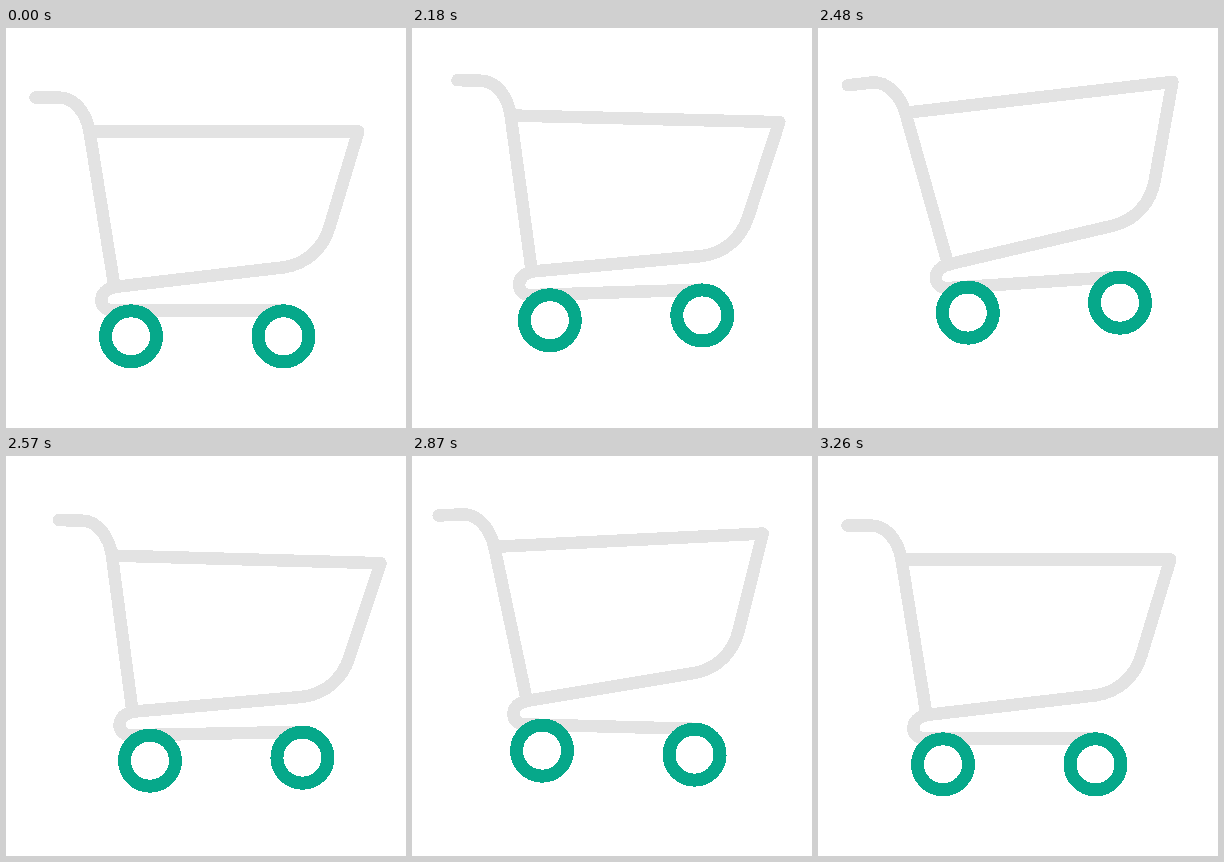
Animation of 400x400 px, one loop 3290 ms. Source, as an HTML page:

```html
<!DOCTYPE html>
<html lang="en">
<head>
<meta charset="utf-8">
<title>Hopping cart</title>
<style>
  html, body { margin: 0; width: 100%; height: 100%; overflow: hidden; background: #fff; }
  svg { display: block; width: 100vw; height: 100vh; shape-rendering: crispEdges; }
  path, circle { fill: none; stroke-width: 12.5; stroke-linecap: round; stroke-linejoin: round; }
  path { stroke: #e3e3e3; }
  circle { stroke: #06a88a; stroke-width: 13; }
</style>
</head>
<body>
<svg viewBox="0 0 400 400">
  <g id="cart">
    <path d="M110 259C91 261 91 282.5 107 282.5H277"/>
    <g id="basket">
      <path d="M29.5 69.5H53C68 69.5 80 84 83.5 103.5L108.5 259L278 239.3C300 236 317 221 323.5 199L352.3 103.5H84"/>
    </g>
    <circle cx="125" cy="308.3" r="25.5"/>
    <circle cx="277.5" cy="308.3" r="25.5"/>
  </g>
</svg>
<script>
const LOOP = 3290, REST = 2000, STEP = 30;

// Eased 0 to 1 between times a and b
function ease(t, a, b) {
  const u = Math.min(1, Math.max(0, (t - a) / (b - a)));
  return u * u * (3 - 2 * u);
}

// Rises from a to a peak at b, falls back by c
const swing = (t, a, b, c) => ease(t, a, b) * (1 - ease(t, b, c));

// Ballistic arc of height 1 between a and b
const arc = (t, a, b) => Math.max(0, 4 * (t - a) * (b - t) / (b - a) ** 2);

// Quick lunge forward, then a slow roll back to rest
function slide(t) {
  const rollback = Math.exp(-((Math.max(0, t - 300) / 392) ** 1.65));
  return 32.5 * ease(t, 90, 300) * rollback * (1 - ease(t, 1000, 1260));
}

// Big hop, then a small bounce
const lift = t => -41 * arc(t, 120, 585) - 15.5 * swing(t, 585, 755, 1110);

// Whole cart: nose up in the hop, nose down in the bounce
const lean = t => -7 * swing(t, 110, 320, 655) + 3 * swing(t, 610, 750, 990);

// Basket: crouch, drag behind, pitch on landing, recoil
const tilt = t => 10 * swing(t, 0, 82, 240) - 5.4 * swing(t, 190, 370, 600)
  + 6 * swing(t, 520, 620, 720) - 5.4 * swing(t, 630, 750, 1168);

const cart = document.getElementById("cart");
const basket = document.getElementById("basket");

function draw(now) {
  const t = Math.floor((now % LOOP - REST) / STEP) * STEP;
  const [x, y, a, b] = [slide, lift, lean, tilt].map(f => f(t).toFixed(3));
  cart.setAttribute("transform", `translate(${x} ${y}) rotate(${a} 201 308)`);
  basket.setAttribute("transform", `rotate(${b} 108 259)`);
}

const begin = performance.now();
function frame() {
  draw(performance.now() - begin);
  requestAnimationFrame(frame);
}
frame();
</script>
</body>
</html>
```
